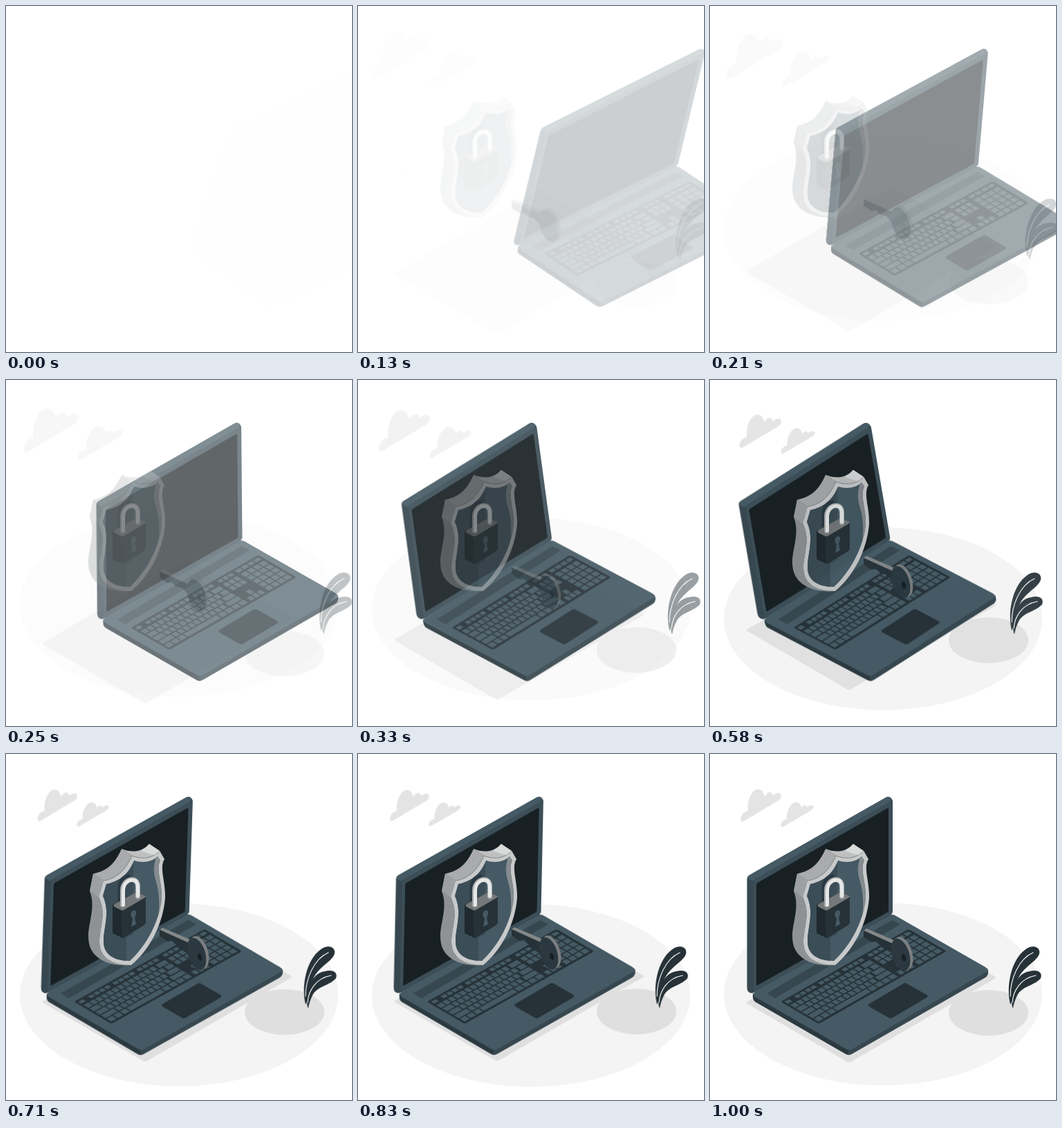
An HTML page that plays this animation: 500 by 500 pixels, repeating every 1040 ms.

```html
<!DOCTYPE html>
<html lang="en">
<head>
<meta charset="utf-8">
<title>Laptop security</title>
<style>
  html, body { margin: 0; width: 100%; height: 100%; overflow: hidden; background: #fff; }
  svg { display: block; width: 100vw; height: 100vh; }
  #laptop { transform-origin: 250px 250px; }
  #clouds { transform-box: fill-box; transform-origin: center; }
</style>
</head>
<body>
<svg viewBox="0 0 500 500">
  <ellipse id="floor" cx="250" cy="347" rx="230" ry="132" fill="#f4f4f4"/>

  <g id="clouds" fill="#e4e4e4">
    <path d="M45 97C43 93 46 84 55 82C53 68 60 53 68 51C75 50 78 56 79 62C82 54 90 53 91 60C96 55 103 55 103 61C102 66 98 68 94 70L49 97Q47 98 45 97Z"/>
    <path d="M103 105C101 101 104 96 111 94C110 82 117 71 123 70C129 69 131 73 132 78C135 73 139 73 140 77C145 73 150 73 150 77L147 81L106 105Q104 106 103 105Z"/>
  </g>

  <g id="shadows" fill="#dfdfdf">
    <path d="M54 358L258 240Q262 238 266 240L411 321Q415 323 411 325L205 444Q201 447 197 444L54 361Q51 359.500 54 358Z"/>
    <ellipse cx="402.500" cy="374" rx="57.500" ry="33"/>
  </g>

  <g id="laptop">
    <!-- base -->
    <path d="M62 346L201 426V435Q198 435 195 433L65 358Q61 355 62 346Z" fill="#2b3940"/>
    <path d="M200 426L401 310Q402.500 313 402 317Q401 321 398 323L206 433Q203 435 200 435Z" fill="#37474f"/>
    <path d="M65 344L258 233Q262 231 267 233L398 308Q404 312 399 315L206 426Q201 429 196 426L65 351Q60 348 65 344Z" fill="#455a64"/>
    <path d="M82 346L263 240L275 246L94 353Z" fill="#37474f"/>
    <g transform="matrix(1.85 -1.05 .55 .32 102 358)">
      <rect width="100" height="100" rx="1.500" ry="4" fill="#263238"/>
      <path id="keys" fill="#455a64"/>
    </g>
    <path d="M230 361L279 332Q282 330 285 332L313 348Q316 350 313 352L264 381Q261 383 258 381L230 365Q227 363 230 361Z" fill="#263238"/>
    <!-- lid -->
    <path d="M53.500 181Q53.500 177 57 175L253 63.500Q258 60 262 64Q264 66 264 70V226Q264 231 260 233L65 344Q60 347 56 344Q53.500 342 53.500 338Z" fill="#37474f"/>
    <path d="M54 179Q54 177 57 175L253 63.500Q258 60 262 64L260 69L65 181Q62 183 61 184Z" fill="#455a64"/>
    <path d="M62.500 186Q62.500 183 65 181.500L258 70.500Q264 67 264 73V226Q264 231 260 233L65 344Q62.500 345 62.500 340Z" fill="#3c4e57"/>
    <path d="M67 189Q67 187 69 186L255 79Q258 77 258 80V226Q258 228 256 229L69 334Q67 335 67 333Z" fill="#182024"/>
  </g>

  <g id="plant" fill="#263238">
    <path d="M434 362C427 335 436 290 462 279C475 275 480 286 473 294C465 304 449 311 443 330C440 342 438 352 436 358Z"/>
    <path d="M437 366C433 345 441 317 462 314C474 311 481 316 478 324C470 334 453 335 445 347C441 354 439 361 438 367Z"/>
    <path d="M434 350C434 325 446 296 467 287M437 359C438 342 449 324 471 320" fill="none" stroke="#fff" stroke-width="1.100" stroke-linecap="round"/>
  </g>

  <g id="shield">
    <!-- thickness -->
    <path d="M126 173L141 183L134 207C146 232 135 250 135 272C135 291 150 303 181 305Q158 307 143 300C125 292 119 279 119 263C119 243 130 222 121 198Z" fill="#8e9294"/>
    <path d="M126 173L121 198L134 207L141 183Z" fill="#9da0a2"/>
    <path d="M126 173C145 169 157 160 167 137L182 147C172 169 160 180 141 183Z" fill="#a9abac"/>
    <path d="M167 137C182 143 196 142 207 130L222 140C210 152 196 152 182 147Z" fill="#bfc0c0"/>
    <path d="M207 130L222 140L229 153L219 148L195 140Q202 136 207 130Z" fill="#d9dada"/>
    <!-- front -->
    <path d="M141 183C160 180 172 169 182 147C196 152 210 152 222 140L229 152C221 164 231 185 230 208C227 246 207 284 181 305C150 305 135 291 135 272C135 250 146 232 134 207Z" fill="#c8c9ca"/>
    <path d="M141 183C160 180 172 169 182 147C196 152 210 152 222 140" fill="none" stroke="#777b7d" stroke-width=".7"/>
    <clipPath id="panel">
      <path d="M145 188C164 184 177 174 185 154C198 158 211 156 219 148L223 154C216 166 226 187 225 208C222 242 203 277 179 299C154 299 141 288 141 271C141 250 151 229 140 205Z"/>
    </clipPath>
    <g clip-path="url(#panel)">
      <rect x="130" y="140" width="102" height="170" fill="#455a64"/>
      <path d="M130 140H184V260L174 266V310H130Z" fill="#3b4d56"/>
      <path d="M214 145H232V240L214 258C222 236 224 207 217 185Q211 168 216 153Z" fill="#858b8e"/>
    </g>
    <!-- lock -->
    <path d="M165 218V193C165 184 171 177 179 177" fill="none" stroke="#2b3a42" stroke-width="7"/>
    <path d="M154 219Q154 216 157 218L169 225V266L156 260Q154 259 154 256Z" fill="#1f292e"/>
    <path d="M167 226L200 206Q202 205 202 208V243Q202 245 200 247L171 265Q167 267 167 263Z" fill="#263238"/>
    <path d="M157 217L186 201Q189 199 192 201L201 205Q203 206 200 208L171 225Q168 227 165 225L157 221Q154 219 157 217Z" fill="#757879"/>
    <path d="M168.500 218V197C168.500 188 175 181.500 182 181.500C188 181.500 190.500 186 190.500 192V206" fill="none" stroke="#a8abac" stroke-width="7" stroke-linecap="round"/>
    <path d="M169.500 218V197C169.500 188 176 182 182 182C188 182 190.500 186 190.500 192V205" fill="none" stroke="#e6e7e7" stroke-width="5" stroke-linecap="round"/>
    <path d="M180.500 232C180.500 226 187 223 188 229C188 232 187 235 186 236L188 246L181 250L183 238Q180.500 236 180.500 232Z" fill="#455a64"/>
  </g>

  <g id="key">
    <path d="M222 255L226 252L266 270L264 289L259 284L254 279L246 277L240 271L233 272L222 264Z" fill="#263238"/>
    <path d="M222 255L226 252L268 270L264 274Z" fill="#858889"/>
    <ellipse cx="279" cy="288" rx="13" ry="24.500" transform="rotate(-17 279 288)" fill="#7b7f81"/>
    <ellipse cx="275.500" cy="290" rx="12.500" ry="24" transform="rotate(-17 275.500 290)" fill="#2b383f"/>
    <ellipse cx="280" cy="294.500" rx="3" ry="5.500" transform="rotate(-17 280 294.500)" fill="#172025"/>
  </g>
</svg>

<script>
  const LOOP = 1040, FRAME = 1000 / 24, TICK = 1000 / 60, LEAD = 36;
  const easing = 'cubic-bezier(.36,-.01,.5,1.38)';
  const $ = id => document.getElementById(id);

  function buildKeys() {
    let d = '';
    const add = (u, v, w, h) => { d += `M${u} ${v}h${w}v${h}h${-w}z`; };
    const run = (u, v, count, width, h) => {
      const step = width / count;
      for (let i = 0; i < count; i++) add(u + i * step, v, step - 0.9, h);
    };
    // function row
    add(1.5, 5, 3.6, 9);
    [9, 27.5, 46].forEach(u => run(u, 5, 4, 16.5, 9));
    run(66, 5, 3, 12, 9);
    run(80, 5, 4, 19.2, 9);
    // main block: first key, letters, last key
    [[3.6, 12, 8], [6, 12, 5.6], [7.2, 11, 8.6], [9.4, 10, 10.6]].forEach(([first, count, last], row) => {
      const v = 20 + row * 15.5;
      add(1.5, v, first, 12.5);
      run(2.4 + first, v, count, 61.2 - first - last, 12.5);
      add(64.4 - last, v, last - 0.9, 12.5);
    });
    run(1.5, 82, 3, 15, 12.5);
    add(16.5, 82, 26, 12.5);
    run(43.4, 82, 4, 21, 12.5);
    // navigation and arrows
    run(66, 20, 3, 12, 12.5);
    run(66, 35.5, 3, 12, 12.5);
    add(70, 66.5, 3.1, 12.5);
    run(66, 82, 3, 12, 12.5);
    // number pad
    for (let row = 0; row < 5; row++) run(80, 20 + row * 15.5, 4, 19.2, 12.5);
    $('keys').setAttribute('d', d);
  }

  const clips = [];
  function play(id, frames) {
    const steps = frames.map(f => ({ easing, ...f }));
    const clip = $(id).animate(steps, { duration: 1000, fill: 'both' });
    clip.pause();
    clips.push(clip);
  }
  const enter = (id, from, to) =>
    play(id, [{ opacity: 0, transform: from }, { opacity: 1, transform: to }]);

  buildKeys();
  enter('floor', 'translateY(-30px)', 'translateY(0px)');
  enter('clouds', 'scale(1.5)', 'scale(1)');
  enter('shadows', 'translateY(30px)', 'translateY(0px)');
  enter('key', 'translateY(30px)', 'translateY(0px)');
  enter('plant', 'translateX(30px)', 'translateX(0px)');
  play('shield', [{ opacity: 0 }, { opacity: 1 }]);
  // unlike function lists make the browser blend these as matrices
  play('laptop', [
    { offset: 0, opacity: 0, transform: 'translate3d(250px, 0, 0) skewX(-20deg)' },
    { offset: 0.6, opacity: 1, transform: 'skewX(10deg)' },
    { offset: 0.8, opacity: 1, transform: 'skewX(-2deg)' },
    { offset: 1, opacity: 1, transform: 'translate3d(0, 0, 0)' }
  ]);

  const start = performance.now();
  function draw() {
    const t = Math.max(0, performance.now() - start) % LOOP;
    const n = Math.floor((t + 4) / FRAME);
    const shown = n < 2 ? 0 : n; // the opening pose holds for two steps
    const time = Math.floor((shown * FRAME + LEAD) / TICK) * TICK;
    clips.forEach(c => { c.currentTime = time; });
    requestAnimationFrame(draw);
  }
  draw();
</script>
</body>
</html>
```
